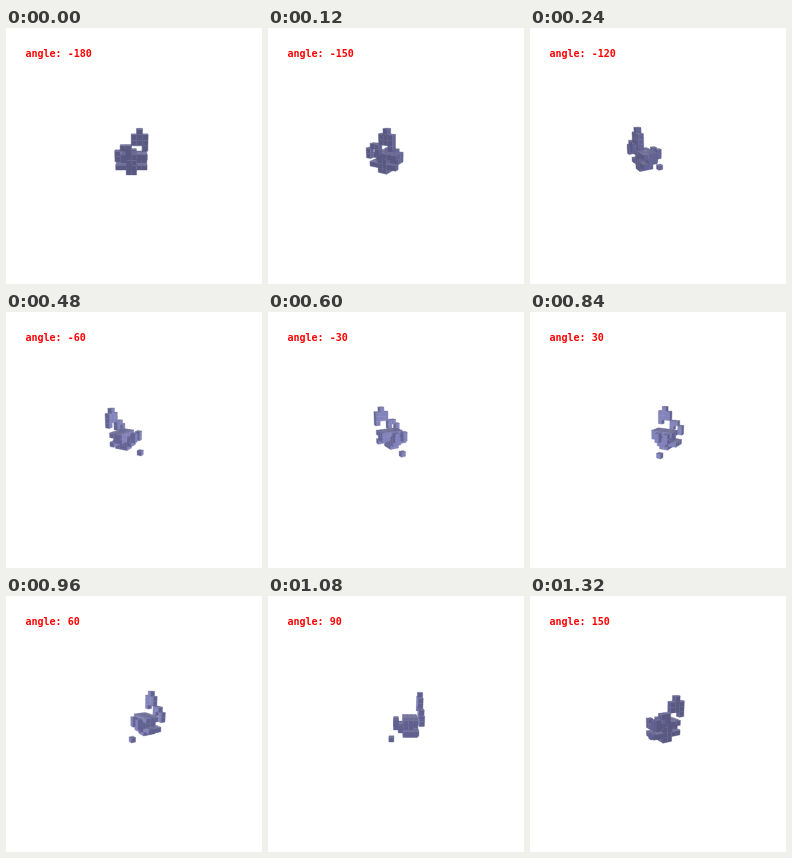
These frames come from a looping animation (256x256 px, 1.44 s). An HTML page with a canvas:

```html
<!DOCTYPE html>
<html>
<head>
<meta charset="utf-8">
<style>
html, body { margin: 0; width: 100%; height: 100%; overflow: hidden; background: #fff; }
canvas { display: block; width: 256px; height: 256px; }
</style>
</head>
<body>
<canvas id="stage" width="256" height="256"></canvas>
<script>
const ctx = document.getElementById('stage').getContext('2d');
const STEP = 120, STEPS = 12;
const DIST = 40, FOCAL = 188, SIN = 0.28, COS = 0.96;

const cells = new Map();
const key = (x, y, z) => x + ',' + y + ',' + z;

// Fill an axis-aligned box of unit cubes, bounds inclusive.
function box(x0, x1, y0, y1, z0, z1) {
  for (let x = x0; x <= x1; x++)
    for (let y = y0; y <= y1; y++)
      for (let z = z0; z <= z1; z++) cells.set(key(x, y, z), [x, y, z]);
}

// tall plate at the back
box(-1, -1, 6, 6, 5, 5);
box(-2, 0, 4, 5, 5, 5);
box(-2, -2, 3, 3, 5, 5);
box(1, 2, 3, 3, 5, 5);
box(1, 1, 2, 2, 5, 5);
box(3, 3, 1, 2, 5, 5);
// body
box(-2, 2, 1, 1, 2, 4);
box(-2, 2, 0, 0, 2, 3);
box(0, 1, 0, 0, 4, 4);
box(0, 3, -1, -1, 2, 4);
box(-2, -1, -1, -1, 4, 4);
box(0, 1, -2, -2, 2, 4);
// front knobs
box(0, 2, 0, 0, 1, 1);
box(0, 1, -1, -1, 1, 1);
box(0, 0, 0, 1, 0, 0);
box(2, 2, 0, 1, 0, 0);
// loose cube
box(1, 1, -3, -3, -1, -1);

const faces = [
  { n: [0, 0, -1], color: 'rgb(132,132,188)' },
  { n: [0, 0, 1], color: 'rgb(88,88,130)' },
  { n: [1, 0, 0], color: 'rgb(97,97,144)' },
  { n: [-1, 0, 0], color: 'rgb(99,99,148)' },
  { n: [0, 1, 0], color: 'rgb(108,110,150)' },
  { n: [0, -1, 0], color: 'rgb(84,84,124)' }
];
const corners = [[-0.5, -0.5], [0.5, -0.5], [0.5, 0.5], [-0.5, 0.5]];

for (const f of faces) {
  const axis = f.n.findIndex(v => v);
  f.quad = corners.map(([a, b]) => {
    const p = [0, 0, 0];
    p[axis] = f.n[axis] / 2;
    p[(axis + 1) % 3] = a;
    p[(axis + 2) % 3] = b;
    return p;
  });
}

const cubes = [...cells.values()].map(pos => ({
  pos,
  open: faces.filter(f => !cells.has(key(...pos.map((v, i) => v + f.n[i]))))
}));

function draw(angle) {
  const a = angle * Math.PI / 180, c = Math.cos(a), s = Math.sin(a);
  const cam = [DIST * COS * s, DIST * SIN, -DIST * COS * c];

  const project = ([x, y, z]) => {
    const side = x * c + z * s, deep = z * c - x * s;
    const k = FOCAL / (DIST + deep * COS - y * SIN);
    return [128 + side * k, 128 - (y * COS + deep * SIN) * k];
  };
  const dist = p => Math.hypot(p[0] - cam[0], p[1] - cam[1], p[2] - cam[2]);

  ctx.fillStyle = '#fff';
  ctx.fillRect(0, 0, 256, 256);
  ctx.lineWidth = 0.4;
  ctx.lineJoin = 'round';

  cubes.sort((p, q) => dist(q.pos) - dist(p.pos));
  for (const { pos, open } of cubes) {
    for (const f of open) {
      const facing = f.n.reduce((sum, n, i) => sum + n * (cam[i] - pos[i]), 0);
      if (facing <= 0.5) continue;
      ctx.beginPath();
      for (const q of f.quad) ctx.lineTo(...project(q.map((v, i) => v + pos[i])));
      ctx.closePath();
      ctx.fillStyle = ctx.strokeStyle = f.color;
      ctx.fill();
      ctx.stroke();
    }
  }

  ctx.fillStyle = '#f00';
  ctx.font = 'bold 10px "DejaVu Sans Mono", "Liberation Mono", monospace';
  ctx.fillText('angle: ' + angle, 19.5, 29);
}

let shown = -1;
function tick() {
  const i = Math.floor(performance.now() / STEP) % STEPS;
  if (i !== shown) {
    shown = i;
    draw(i * 30 - 180);
  }
  requestAnimationFrame(tick);
}
tick();
</script>
</body>
</html>
```
